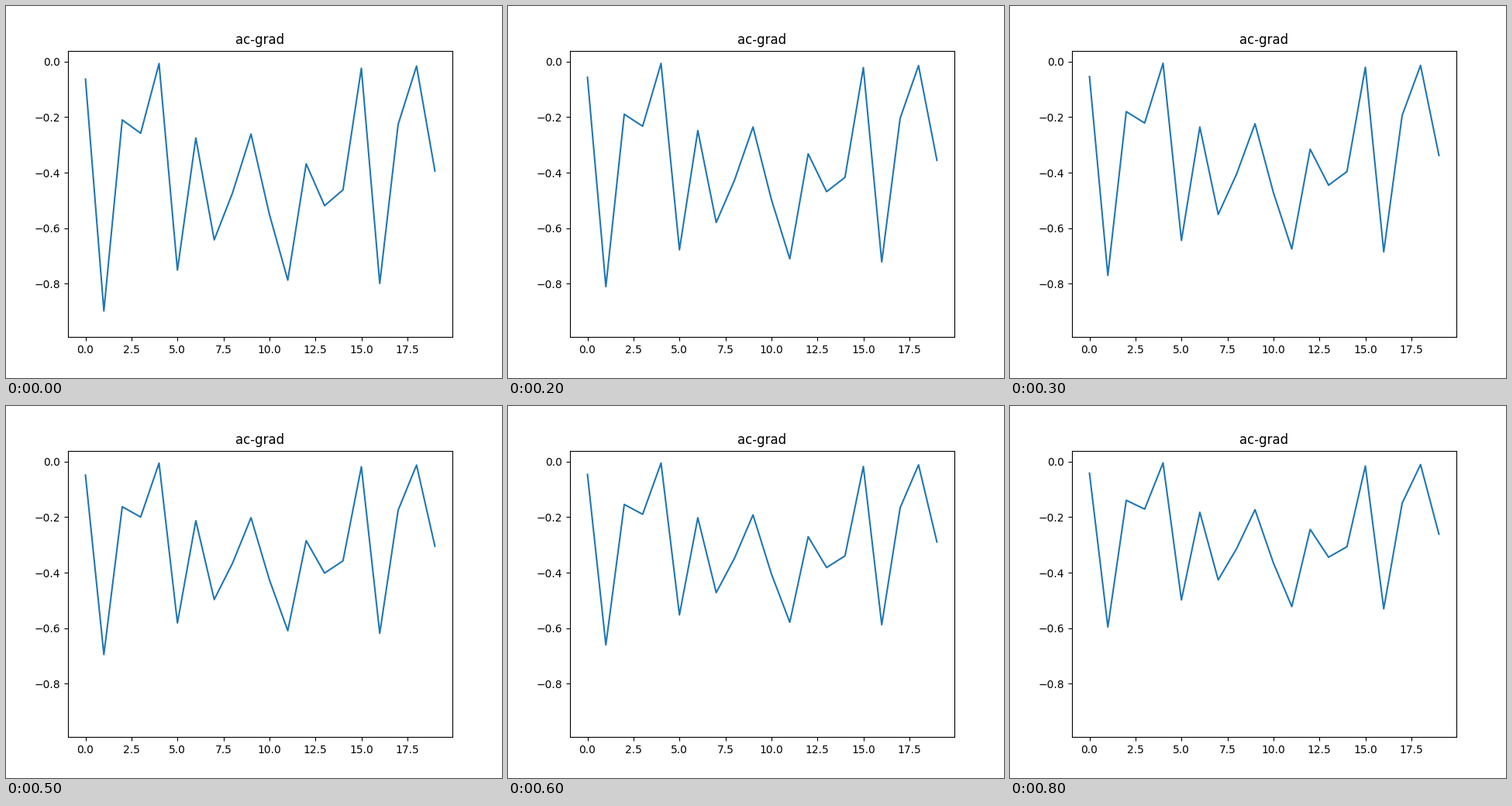
A matplotlib script that plays this animation: 640x480 px, repeating every 0.9 s.

```python
import numpy as np
import matplotlib.pyplot as plt
from matplotlib.animation import FuncAnimation

FRAMES = 9
INTERVAL = 100
DECAY = 0.95

# Heights of the curve's corners; every later shape follows from the decay.
corners = -np.array([
    0.063, 0.898, 0.210, 0.258, 0.007, 0.751, 0.275, 0.642, 0.472, 0.261,
    0.550, 0.787, 0.368, 0.519, 0.462, 0.024, 0.799, 0.226, 0.016, 0.394,
])


def curve(frame):
    return corners * DECAY ** frame


plt.rcParams["font.family"] = "DejaVu Sans"
fig, ax = plt.subplots(figsize=(6.4, 4.8), dpi=100)

# The view is autoscaled to the values one step before the loop begins.
line, = ax.plot(curve(-1), color="#1f77b4", lw=1.5)
ax.set_title("ac-grad")
ax.set_xlim(ax.get_xlim())
ax.set_ylim(ax.get_ylim())


def update(frame):
    line.set_ydata(curve(frame))
    return line,


anim = FuncAnimation(fig, update, frames=FRAMES, interval=INTERVAL,
                     repeat=True, repeat_delay=0)
plt.show()
```
